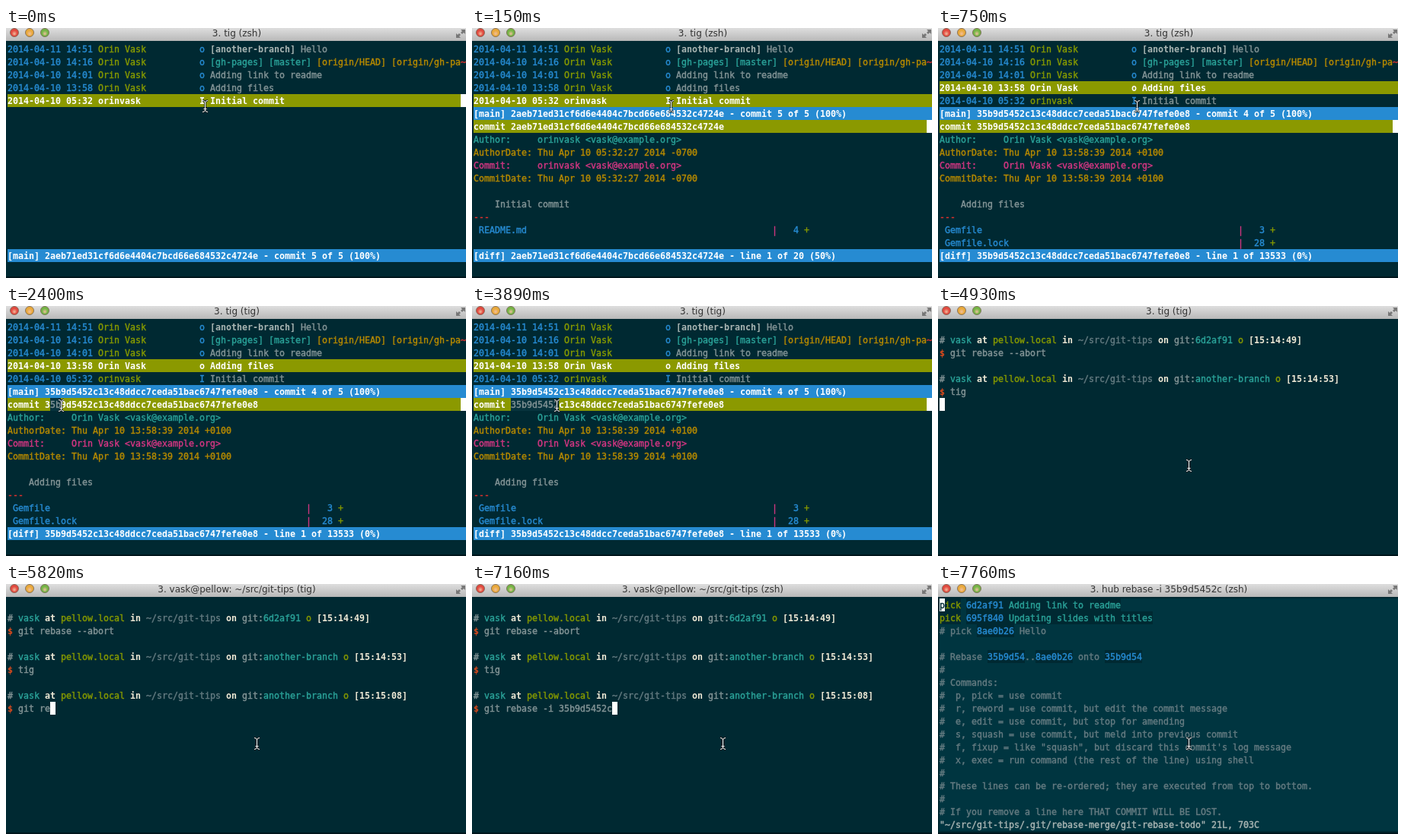
These frames come from a looping animation (604 by 329 pixels, 8 s). An HTML page with a canvas:

```html
<!DOCTYPE html>
<html lang="en">
<head>
<meta charset="utf-8">
<title>Terminal session</title>
<style>
  html, body { margin: 0; width: 100%; height: 100%; overflow: hidden; background: #002932; }
  canvas { display: block; }
</style>
</head>
<body>
<canvas id="stage" width="604" height="329"></canvas>
<script>
const ctx = document.getElementById("stage").getContext("2d");
const LOOP = 8000, CELL = 7, LINE = 17, LEFT = 2, TOP = 19, COLS = 86;
const MONO = "11.63px 'DejaVu Sans Mono', monospace";
const C = {
  bg: "#002932", vim: "#003540", select: "#07333d", gray: "#839496", dim: "#647b81",
  light: "#a9b5b3", cream: "#eee8d5", white: "#ffffff", blue: "#268bd2", green: "#859900",
  yellow: "#b58900", cyan: "#2aa198", magenta: "#d33682", red: "#dc322f", orange: "#dc4a1c",
  bar: "#8b9900"
};

const USER = "vask", HOST = "pellow", AUTHOR = "Orin Vask", EMAIL = "vask@example.org";
const SHORT = "35b9d5452c";
const log = [
  ["2014-04-11 14:51", AUTHOR, "o", "Hello"],
  ["2014-04-10 14:16", AUTHOR, "o", ""],
  ["2014-04-10 14:01", AUTHOR, "o", "Adding link to readme"],
  ["2014-04-10 13:58", AUTHOR, "o", "Adding files"],
  ["2014-04-10 05:32", "orinvask", "I", "Initial commit"]
];
const commits = {
  3: {
    hash: "35b9d5452c13c48ddcc7ceda51bac6747fefe0e8", date: "Thu Apr 10 13:58:39 2014 +0100",
    files: [["Gemfile", 3], ["Gemfile.lock", 28]], position: "line 1 of 13533 (0%)"
  },
  4: {
    hash: "2aeb71ed31cf6d6e4404c7bcd66e684532c4724e", date: "Thu Apr 10 05:32:27 2014 -0700",
    files: [["README.md", 4]], position: "line 1 of 20 (50%)"
  }
};

// Each timeline lists [start, ...values]; a value holds until the next start.
const mouse = [
  [0, 261, 103], [1350, 232, 106], [1500, 176, 113], [1650, 118, 121], [1800, 80, 127],
  [1950, 60, 130], [2100, 54, 131], [2400, 72, 131], [2550, 108, 133], [2700, 147, 137],
  [2850, 173, 139], [3000, 146, 137], [3140, 104, 134], [3290, 66, 132], [3440, 51, 131],
  [3590, 66, 131], [3740, 88, 131], [3890, 111, 131], [4040, 131, 136], [4190, 122, 134],
  [4490, 205, 163], [4640, 329, 210]
];
const titles = [
  [0, "tig (zsh)"], [1500, "tig (tig)"], [5080, `${USER}@${HOST}: ~/src/git-tips (tig)`],
  [5960, `${USER}@${HOST}: ~/src/git-tips (zsh)`], [7460, `hub rebase -i ${SHORT} (zsh)`]
];
const typed = [
  [0, ""], [5230, "g"], [5370, "git"], [5520, "git "], [5820, "git re"], [5960, "git reba"],
  [6110, "git rebase"], [6260, "git rebase -"], [6560, "git rebase -i"],
  [7010, "git rebase -i "], [7160, "git rebase -i " + SHORT]
];
const at = (timeline, t) => timeline.filter(([start]) => start <= t).pop().slice(1);

function block(row, col, count, color) {
  ctx.fillStyle = color;
  ctx.fillRect(LEFT + col * CELL, TOP + row * LINE, count * CELL, LINE);
}
// Regular text gets a hairline outline for a sturdier weight.
function put(row, col, text, color, bold = false) {
  const x = LEFT + col * CELL, y = TOP + row * LINE + 13;
  ctx.font = (bold ? "bold " : "") + MONO;
  ctx.fillStyle = ctx.strokeStyle = color;
  ctx.lineWidth = 0.4;
  ctx.fillText(text, x, y);
  if (!bold) ctx.strokeText(text, x, y);
}
// Writes [text, color, bold] pieces one after another.
function run(row, col, pieces) {
  for (const [text, color, bold] of pieces) {
    put(row, col, text, color, bold);
    col += text.length;
  }
}
function bar(row, text, color) {
  block(row, 0, COLS, color);
  put(row, 0, text, C.white, true);
}

function drawTitle(t) {
  const metal = ctx.createLinearGradient(0, 0, 0, 17);
  metal.addColorStop(0, "#dedede");
  metal.addColorStop(1, "#b8b8b8");
  ctx.fillStyle = metal;
  ctx.fillRect(0, 0, 604, 17);
  ["#e2493f", "#e9a93a", "#73b545"].forEach((color, i) => {
    const x = 11 + i * 20;
    const shade = ctx.createRadialGradient(x, 8, 0, x, 6, 6);
    shade.addColorStop(0, "#f3c0a0");
    shade.addColorStop(0.6, color);
    ctx.fillStyle = shade;
    ctx.strokeStyle = "#75604f";
    ctx.lineWidth = 0.8;
    ctx.beginPath();
    ctx.arc(x, 6, 5.5, 0, Math.PI * 2);
    ctx.fill();
    ctx.stroke();
  });
  ctx.font = "12px 'DejaVu Sans', sans-serif";
  ctx.fillStyle = "#333333";
  ctx.textAlign = "center";
  ctx.fillText("3. " + at(titles, t)[0], 303, 11);
  ctx.textAlign = "left";
  ctx.fillStyle = "#777777";
  ctx.fill(new Path2D("M597 2h6v6l-2-2-2 2-2-2 2-2zM591 7l2 2 2-2 2 2-2 2 2 2h-6z"));
}

function drawLog(selected) {
  log.forEach(([date, author, mark, message], row) => {
    const active = row === selected;
    if (active) block(row, 0, COLS, C.bar);
    const ink = color => active ? C.white : color;
    put(row, 0, date, ink(C.blue), active);
    put(row, 17, author, ink(C.green), active);
    put(row, 36, mark, ink(C.blue), active);
    put(row, row ? 38 : 55, message, ink(C.gray), active);
  });
  put(0, 38, "[another-branch]", C.light, true);
  run(1, 38, [["[gh-pages] [master] ", C.cyan], ["[origin/HEAD] [origin/gh-pa", C.yellow], ["~", C.red]]);
}

function drawDiff(selected) {
  const { hash, date, files, position } = commits[selected];
  const [, author, , message] = log[selected];
  const person = `${author} <${EMAIL}>`;
  bar(6, "commit " + hash, C.bar);
  block(6, COLS - 1, 1, C.white);
  [
    ["Author:", person, C.cyan], ["AuthorDate:", date, C.yellow],
    ["Commit:", person, C.magenta], ["CommitDate:", date, C.yellow]
  ].forEach(([label, value, color], i) => put(7 + i, 0, label.padEnd(12) + value, color));
  put(12, 4, message, C.gray);
  put(13, 0, "---", C.red);
  files.forEach(([name, count], i) => {
    put(14 + i, 1, name, C.blue);
    run(14 + i, 56, [["|", C.magenta], [String(count).padStart(4), C.blue], [" +", C.green]]);
  });
  bar(16, `[diff] ${hash} - ${position}`, C.blue);
}

function drawSelection(t) {
  const firstDrag = t >= 2400 && t < 3440;
  if (!firstDrag && t < 3590) return;
  const start = firstDrag ? 8 : 7;
  const end = Math.round((at(mouse, t)[0] - LEFT) / CELL);
  const stop = t >= 4190 ? 17 : end;
  const text = ("commit " + commits[3].hash).slice(start, stop);
  block(6, start, text.length, C.select);
  put(6, start, text, C.gray);
}

function drawTig(t) {
  const selected = t < 750 ? 4 : 3;
  const split = t >= 150 && t < 4640;
  drawLog(selected);
  bar(split ? 5 : 16, `[main] ${commits[selected].hash} - commit ${selected + 1} of 5 (100%)`, C.blue);
  if (split) {
    drawDiff(selected);
    drawSelection(t);
  } else {
    block(selected, COLS - 1, 1, C.white);
  }
}

function prompt(row, ref, time, command) {
  run(row, 0, [
    ["# ", C.gray], [USER, C.cyan], [" at ", C.cream, true], [HOST + ".local", C.green],
    [" in ", C.cream, true], ["~/src/git-tips", C.dim], [" on ", C.cream, true], ["git:", C.gray],
    [ref, C.cyan], [" o ", C.green], [`[${time}]`, C.cream, true]
  ]);
  run(row + 1, 0, [["$ ", C.orange, true], [command, C.gray]]);
}
function drawShell(t) {
  prompt(1, "6d2af91", "15:14:49", "git rebase --abort");
  prompt(4, "another-branch", "15:14:53", "tig");
  if (t < 5080) return block(6, 0, 1, C.white);
  const [command] = at(typed, t);
  prompt(7, "another-branch", "15:15:08", command);
  if (t < 7310) block(8, 2 + command.length, 1, C.white);
  else block(9, 0, 1, C.white);
}

const help = [
  "#", "# Commands:", "#  p, pick = use commit",
  "#  r, reword = use commit, but edit the commit message",
  "#  e, edit = use commit, but stop for amending",
  "#  s, squash = use commit, but meld into previous commit",
  "#  f, fixup = like \"squash\", but discard this commit's log message",
  "#  x, exec = run command (the rest of the line) using shell",
  "#", "# These lines can be re-ordered; they are executed from top to bottom.",
  "#", "# If you remove a line here THAT COMMIT WILL BE LOST."
];
function drawVim(t) {
  block(0, 0, COLS, C.vim);
  ctx.fillRect(LEFT, TOP, COLS * CELL, 18 * LINE);
  const marked = (row, col, text, color) => {
    block(row, col, text.length, C.bg);
    put(row, col, text, color);
  };
  const pick = (row, hash, message) => {
    marked(row, 0, "pick", C.green);
    marked(row, 5, hash, C.blue);
    marked(row, 12, " " + message, C.cyan);
  };
  pick(0, "6d2af91", "Adding link to readme");
  pick(1, "695f840", "Updating slides with titles");
  put(2, 0, "# pick         Hello", C.dim);
  marked(2, 7, "8ae0b26", C.blue);
  put(4, 0, "# Rebase        ..        onto", C.dim);
  marked(4, 9, "35b9d54", C.blue);
  marked(4, 18, "8ae0b26", C.blue);
  marked(4, 31, "35b9d54", C.blue);
  help.forEach((text, i) => put(5 + i, 0, text, C.dim));
  if (t >= 7760) put(17, 0, "\"~/src/git-tips/.git/rebase-merge/git-rebase-todo\" 21L, 703C", C.light);
  block(0, 0, 1, C.white);
  put(0, 0, "p", C.bg);
}

function drawMouse(t) {
  const [x, y] = at(mouse, t);
  ctx.save();
  ctx.translate(x + 0.5, y);
  const beam = new Path2D("M-3.5-7.5Q-.5-7.5 0-5Q.5-7.5 3.5-7.5M0-5V5M-3.5 7.5Q-.5 7.5 0 5Q.5 7.5 3.5 7.5M-2 3.5H2");
  for (const [color, width] of [["#10191c", 2.4], ["#ffffff", 1]]) {
    ctx.strokeStyle = color;
    ctx.lineWidth = width;
    ctx.stroke(beam);
  }
  ctx.restore();
}

function frame() {
  const t = performance.now() % LOOP;
  ctx.fillStyle = C.bg;
  ctx.fillRect(0, 0, 604, 329);
  ctx.fillStyle = "#00161c";
  ctx.fillRect(0, 327, 604, 2);
  drawTitle(t);
  (t < 4930 ? drawTig : t < 7610 ? drawShell : drawVim)(t);
  drawMouse(t);
  requestAnimationFrame(frame);
}
frame();
</script>
</body>
</html>
```
